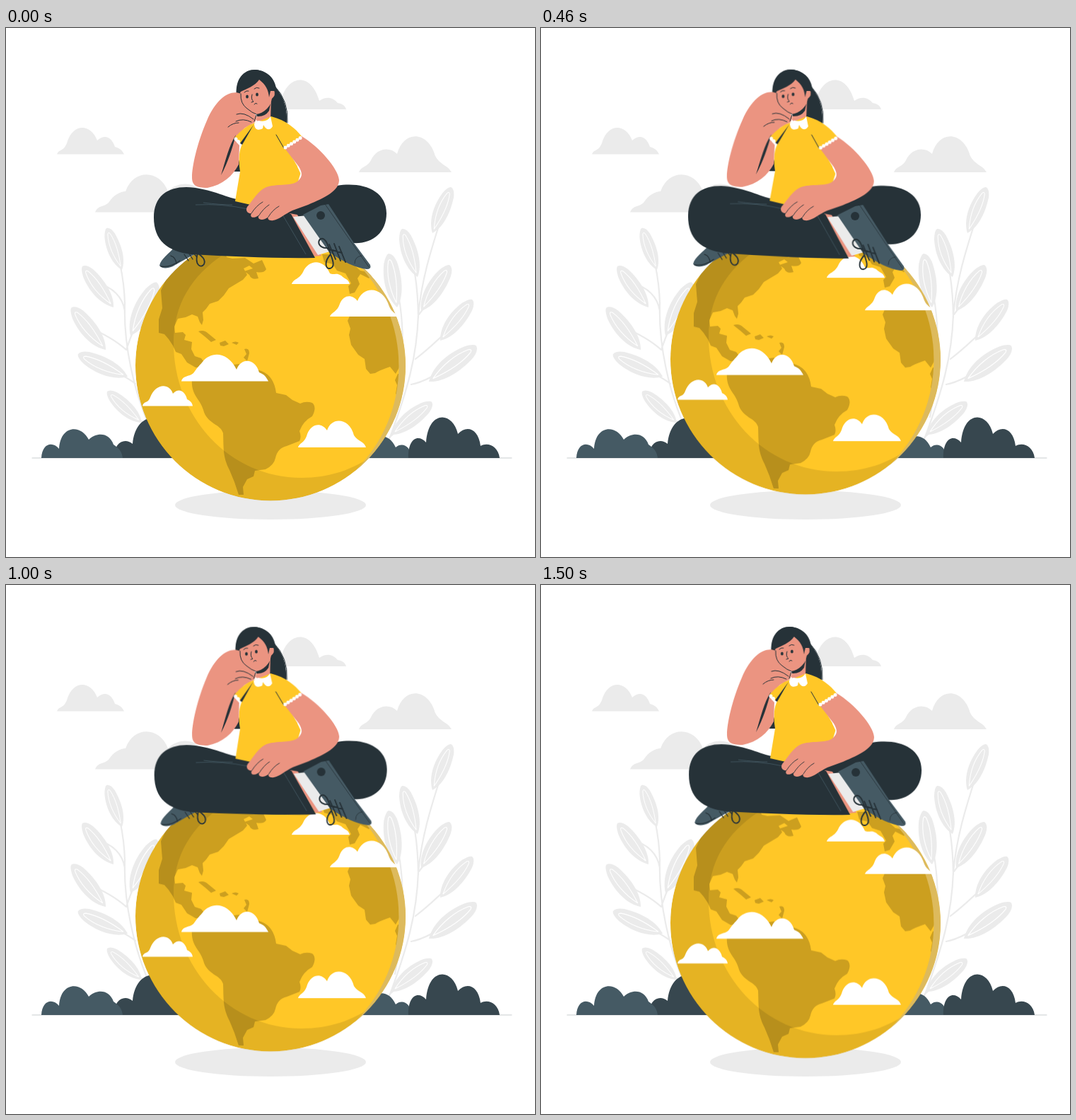
An HTML page that plays this animation: 748 px wide and 748 px high, repeating every 1540 ms.

```html
<!DOCTYPE html>
<html lang="en">
<head>
<meta charset="utf-8">
<title>Sitting on the world</title>
<style>
  html, body { margin: 0; width: 100%; height: 100%; overflow: hidden; background: #fff; }
  svg { display: block; width: 100vw; height: 100vh; }
  .globe { animation: bob 1540ms linear infinite; }
  .girl { transform-origin: 374px 199px; animation: sway 1540ms linear infinite; }
  @keyframes bob {
    0%, 100% { transform: translateY(0); }
    47.4% { transform: translateY(-14px); }
    97.4% { transform: translateY(.6px); }
  }
  @keyframes sway {
    0%, 50%, 100% { transform: rotate(0); }
    25% { transform: rotate(1deg); }
    75% { transform: rotate(-1deg); }
  }
  .pale { fill: #ebebeb; }
  .stem { fill: none; stroke: #ebebeb; stroke-width: 2.2; stroke-linecap: round; }
  .mid { fill: #455a64; }
  .slate { fill: #37474f; }
  .dark { fill: #263238; }
  .skin { fill: #eb9481; }
  .gold { fill: #ffc727; }
  .white { fill: #fff; }
  .land { fill: #000; opacity: .2; }
  .ink { fill: none; stroke: #263238; stroke-linecap: round; stroke-linejoin: round; }
  .lace { fill: none; stroke: #fff; stroke-width: 5; stroke-linecap: round; stroke-dasharray: 0 5; }
</style>
</head>
<body>
<svg viewBox="0 0 748 748">
  <defs>
    <g id="leaf">
      <path class="pale" d="M0 0C-11-13-14-36-8-58Q-4-69 0-70Q6-69 9-58C13-36 11-13 0 0Z"/>
      <path d="M0-6C-6-24-7-44-2-60Q0-64 2-60C6-44 4-24 0-6" fill="none" stroke="#fff" stroke-width="1"/>
    </g>
    <clipPath id="disc"><circle cx="374" cy="477.5" r="191"/></clipPath>
  </defs>

  <!-- sky -->
  <g class="pale">
    <path d="M72 178.500C75 171 81 175 86 163C94 135 119 134 129 159C139 150 149 153 154 168C160 170 164 172 167 178.500Z"/>
    <path d="M370 115L388 105C397 66 431 61 443 103C452 96 463 98 469 106C475 107 479 109 481 115Z"/>
    <path d="M499 204C502 195 510 198 516 187C524 170 542 167 553 178C562 144 597 145 607 181C614 194 625 194 630 204Z"/>
    <path d="M126 260.500C130 250 138 254 145 247C152 236 162 231 169 231C181 198 218 201 229 231C243 217 262 219 270 226L290 260.500Z"/>
  </g>

  <!-- plants -->
  <path class="stem" d="M204 566C181 515 166 448 168 390C167 350 158 315 148 292M168 400Q163 370 128 360M170 455Q150 437 116 423M183 503Q165 489 125 474M200 560Q182 554 160 530M170 455Q180 425 199 387"/>
  <path class="stem" d="M538 592C569 510 581 464 583 405C589 345 606 300 619 257M583 410Q582 340 567 310M584 405Q600 385 614 358M550 550Q573 430 547 345M579 468Q605 448 638 414M573 504Q596 500 640 470M542 579Q560 563 582 545"/>
  <g>
    <use href="#leaf" transform="translate(164 342) rotate(-20) scale(.9)"/>
    <use href="#leaf" transform="translate(152 395) rotate(-37) scale(1.04)"/>
    <use href="#leaf" transform="translate(141 455) rotate(-39) scale(1.1)"/>
    <use href="#leaf" transform="translate(172 493) rotate(-66) scale(1.1)"/>
    <use href="#leaf" transform="translate(192 558) rotate(-48) scale(.94)"/>
    <use href="#leaf" transform="translate(176 435) rotate(26) scale(1.2)"/>
    <use href="#leaf" transform="translate(603 290) rotate(22)"/>
    <use href="#leaf" transform="translate(582 352) rotate(-18) scale(1.02)"/>
    <use href="#leaf" transform="translate(587 400) rotate(32) scale(1.09)"/>
    <use href="#leaf" transform="translate(553 395) rotate(-9) scale(1.1)"/>
    <use href="#leaf" transform="translate(614 442) rotate(38) scale(1.05)"/>
    <use href="#leaf" transform="translate(598 500) rotate(53) scale(1.2)"/>
    <use href="#leaf" transform="translate(545 575) rotate(51) scale(1.05)"/>
  </g>

  <!-- ground -->
  <path class="slate" d="M153 608C152 587 167 578 179 588C182 551 211 541 226 564L260 608Z"/>
  <path class="mid" d="M50 608C51 587 66 584 75 595C77 561 106 560 117 582C129 571 146 572 152 589C161 595 164 600 165 608Z"/>
  <path class="mid" d="M490 608L514 588C523 573 542 573 551 593C560 585 573 591 573 608Z"/>
  <path class="slate" d="M569 608C568 582 582 573 594 586C597 541 631 541 639 574C651 561 668 566 671 591C682 585 696 592 698 608Z"/>
  <path class="ink" d="M37 608H715" stroke-width=".25"/>
  <ellipse class="pale" cx="374" cy="674.500" rx="135" ry="20.500"/>

  <g class="globe">
    <g clip-path="url(#disc)">
      <circle class="gold" cx="374" cy="477.5" r="191"/>
      <g class="land">
        <path d="M250 318L310 318L312 324L320 326L338 325L350 333L362 328L368 341Q365 347 354 345L357 354Q347 357 344 349L337 344L349 340L344 336L336 340L341 349L335 356L325 362L315 368L308 378L300 386L288 390L283 397L278 402L279 413L277 420L274 416L271 408L263 405L254 409L243 411L238 422L239 431L250 430L254 434L252 441L263 444L262 454L267 464L276 467L286 480L268 480L256 473L248 461L240 458L236 449L230 440L224 433L216 431L216 412L221 396L219 371L231 345Z"/>
        <path d="M272 429Q280 426 286 432L297 441L290 444L282 437ZM302 445L310 442L315 447L308 450L303 449ZM319 445Q325 442 329 445L326 448ZM337 454Q344 452 344 460L341 471L336 466L340 461Z"/>
        <path d="M263 495C261 520 274 523 279 540C284 560 304 560 307 573C308 594 306 605 316 625L323 642L329 660L336 660L335 649L341 638L350 634L352 626L367 624Q379 618 381 608Q384 594 397 591L415 584Q418 578 415 570Q420 556 433 549Q440 536 433 530Q424 527 416 531L405 526L396 519L382 516Q379 492 361 485L330 475L290 480Z"/>
        <path d="M490 398L553 398L556 480L551 489L543 479Q528 484 522 488L515 489L509 482L507 468L498 462L488 448L485 434L487 425L483 414ZM554 489L550 498L553 505L551 517L558 526L564 490Z"/>
        <path d="M447 320L475 320L501 343L521 347L513 354L501 348L497 354L500 362L493 374L486 376L484 365L488 361L480 347L468 343L462 334L450 331Z"/>
      </g>
      <path d="M183 286H566V570L522 602C491 625 456 636 418 636C316 636 237 550 237 445C237 392 262 350 308 320L340 286H183V669H566V570L522 602C491 625 456 636 418 636C316 636 237 550 237 445Z" fill-rule="nonzero" opacity="0"/>
      <path d="M330 286H183V669H566V566Q545 586 522 602C491 625 456 636 418 636C316 636 237 550 237 445C237 392 262 350 308 320Z" opacity=".1"/>
      <path d="M492 328A209 209 0 0 1 493 627L566 669V328Z" fill="#ddba5c"/>
    </g>
    <g class="white">
      <path d="M404 362C407 354 414 356 420 345C428 327 449 326 458 347C464 350 466 345 474 350C478 355 484 354 486 362Z"/>
      <path d="M458 408C461 401 468 402 472 390C478 376 490 377 497 386C505 364 533 364 542 394C546 403 551 402 553 408Z"/>
      <path d="M248 499.500C250 491 260 493 265 488C272 478 274 477 278 472C290 457 313 457 326 483C332 466 352 466 358 487C366 490 368 494 371 499.500Z"/>
      <path d="M193 534.500C195 527 201 531 204 522C212 502 231 502 236 517C245 507 254 515 256 525C260 527 263 529 264 534.500Z"/>
      <path d="M413 593C416 585 422 588 426 574C432 559 446 557 454 569C460 549 486 551 492 576C498 585 506 584 509 593Z"/>
    </g>
  </g>

  <g class="girl">
    <!-- hair behind -->
    <path class="dark" d="M326 98C323 70 338 58 353 59C372 61 380 73 382 85C395 100 398 118 397 135L374 128L356 110Z"/>
    <path class="ink" d="M380 82Q400 103 398 134" stroke-width="1"/>
    <path class="dark" d="M317 203L329 186L334 203Z"/>

    <!-- left shoe -->
    <path class="mid" d="M217 336C219 326 232 318 238 310L276 316C263 321 245 332 236 337C229 340 221 341 217 336Z"/>
    <path class="ink" d="M233 322Q240 324 241 333M252 320L258 329M259 319L264 327M265 318L270 324M219 337Q232 339 246 329" stroke-width="1.300"/>
    <path class="ink" d="M271 318C266 336 276 340 280 334C283 327 276 322 271 318" stroke-width="1.800"/>

    <!-- legs -->
    <path class="dark" d="M390 262L425 235L468 223C503 217 538 229 538 262C538 290 517 306 490 304L452 250L425 270Z"/>
    <path class="skin" d="M401 262L412 264L446 322L436 323Z"/>
    <path fill="#ebebeb" d="M406 267L426 265L458 316L441 321Z"/>
    <path class="dark" d="M209 268C209 238 228 225 255 225C285 226 305 237 326 242L350 248L403 263L437 325C380 326 320 323 262 320C228 316 209 300 209 268Z"/>
    <path d="M391 264L424 320M268 250Q306 248 342 256M279 247Q303 250 320 250" fill="none" stroke="#455a64" stroke-width=".8"/>

    <!-- right shoe -->
    <path class="mid" d="M420 264L445 251L456 249L492 304L515 335Q517 341 510 341C494 339 476 330 457 317Z"/>
    <path class="ink" d="M451 249L492 308L513 338M493 333Q493 323 503 322" stroke-width=".8"/>
    <circle class="dark" cx="445" cy="265" r="6"/>
    <path class="ink" d="M457 311C436 313 441 293 450 299C456 304 456 312 459 320C449 331 452 341 458 340C466 338 462 328 459 320M457 306L466 327M464 305L473 329M471 309L480 331M455 312L475 318" stroke-width="1.900"/>

    <!-- neck and shirt -->
    <path class="skin" d="M356 107L375 98L374 131L363 139L354 130Z"/>
    <path class="dark" d="M354 119C364 120 370 114 374 107L372 117Q366 126 355 125Z"/>
    <path class="gold" d="M350 135L375 125C397 131 409 142 418 153L397 170L417 204L412 220L402 242L346 250L324 245L331 203C328 183 330 173 334 164Z"/>
    <path class="ink" d="M382 151L393 170" stroke-width="1"/>

    <!-- right arm -->
    <path class="white" d="M412 196L420 194L418 209Z"/>
    <path class="skin" d="M394 170L418 153C443 168 470 199 471 215C471 230 451 240 427 250L405 258C394 263 386 271 378 272C372 273 369 270 371 267C364 273 355 272 357 265C350 270 344 268 347 262C342 263 338 258 341 253C349 244 356 230 368 225C382 220 402 224 412 217C419 211 420 206 414 196Z"/>
    <path class="ink" d="M347 262Q354 251 363 246M357 266Q364 255 372 250M371 267Q377 257 386 252" stroke-width=".9"/>
    <path class="lace" d="M395 169L417 155"/>

    <!-- face -->
    <path class="skin" d="M331 86C331 107 338 122 353 122C365 121 374 111 376 100Q382 95 379 88Q375 86 373 90L360 71L343 72Z"/>
    <path class="dark" d="M327 96C323 72 338 59 353 59C369 60 380 73 380 89L374 89L372 98C371 87 367 80 358 73C352 82 340 86 332 90Z"/>
    <path class="ink" d="M337 91Q340 88 343 89M351 86Q354 83 358 85M348 94Q346 101 350 104L347 105M351 108Q353 105 355 107" stroke-width="1"/>
    <g class="dark">
      <ellipse cx="341" cy="97" rx="1.900" ry="2.500"/>
      <ellipse cx="355" cy="94" rx="1.900" ry="2.500"/>
      <circle cx="377" cy="101" r="1.200"/>
    </g>

    <!-- left arm -->
    <path class="skin" d="M332 93C319 87 299 96 284 131C270 163 263 196 263 211C263 222 268 226 285 226C306 222 321 209 329 193L330 166L322 157L338 141L351 134Q357 127 352 122Q346 119 341 114Q331 106 332 93Z"/>
    <path class="ink" d="M332 93Q331 107 341 114Q348 120 354 122M354 123L351 132M326 122Q336 118 350 129M325 132Q335 127 347 133M314 140Q321 134 329 134" stroke-width="1"/>
    <path class="dark" d="M304 208C311 186 315 167 325 151C320 170 314 190 304 208Z"/>
    <path class="gold" d="M352 134Q338 138 323 155L333 164L350 145Z"/>
    <path class="dark" d="M350 137L331 163L334 165Z"/>
    <path class="lace" d="M325 157L330 162" stroke-width="3.500"/>
    <path class="white" d="M351 135C351 145 358 145 363 142L364 137C368 145 374 145 377 139L374 125Q369 134 357 131Z"/>
  </g>
</svg>
</body>
</html>
```
